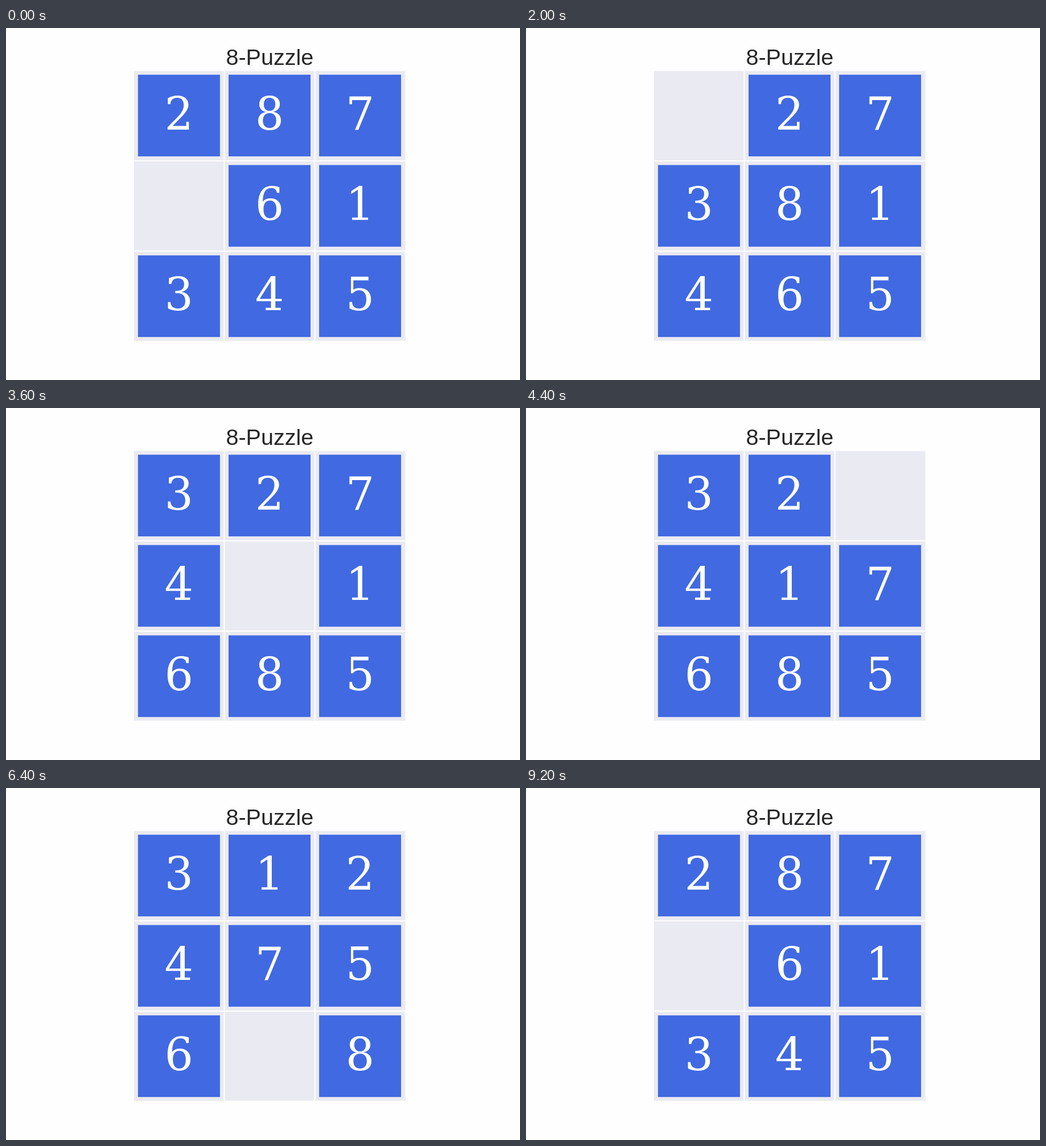
These frames come from a looping animation (903x620 px, 9600 ms). An HTML page:

```html
<!DOCTYPE html>
<html lang="en">
<head>
<meta charset="utf-8">
<title>8-Puzzle</title>
<style>
  html, body { margin: 0; width: 100%; height: 100%; overflow: hidden; background: #fefefe; }
  svg { display: block; }
  text { text-anchor: middle; }
  .title { font: 39.5px "Liberation Sans", Arial, sans-serif; fill: #262626; }
  #tiles { font: 79.5px "DejaVu Serif", serif; fill: #fff; }
  #tiles.solved { fill: #ffd700; }
  #tiles rect { fill: #4169e1; }
</style>
</head>
<body>
<svg width="903" height="620" viewBox="0 0 903 620">
  <text class="title" x="463.3" y="65">8-Puzzle</text>
  <rect x="225" y="75.7" width="476.5" height="475" fill="#eaeaf2"/>
  <path d="M383.5 75.7V550.7M542.7 75.7V550.7M225 233.9H701.5M225 393H701.5" stroke="#fff" stroke-width="2"/>
  <g id="tiles"></g>
</svg>
<script>
const STEP = 400, LOOP = 9600, RESTART = 9200, PITCH = 159.1;
const START = [2, 8, 7, 0, 6, 1, 3, 4, 5];
// Cells visited by the gap, numbered row by row
const GAP_PATH = [3, 6, 7, 4, 1, 0, 3, 6, 7, 4, 5, 2, 1, 4, 5, 8, 7, 4, 3, 0];
const LAST = GAP_PATH.length - 1;

const boards = [START];
for (let i = 1; i <= LAST; i++) {
  const board = [...boards[i - 1]], from = GAP_PATH[i - 1], to = GAP_PATH[i];
  [board[from], board[to]] = [board[to], board[from]];
  boards.push(board);
}

const group = document.getElementById("tiles");
for (let n = 1; n <= 8; n++) {
  group.innerHTML += `<g><rect width="144" height="143.8"/><text x="72" y="96.7">${n}</text></g>`;
}

let shown = -1;
function draw(now) {
  const time = now % LOOP;
  const move = time < RESTART ? Math.min(Math.floor(time / STEP), LAST) : 0;
  if (move !== shown) {
    shown = move;
    boards[move].forEach((n, cell) => {
      if (!n) return;
      const x = 231.9 + PITCH * (cell % 3), y = 82.3 + PITCH * Math.floor(cell / 3);
      group.children[n - 1].setAttribute("transform", `translate(${x} ${y})`);
    });
    group.classList.toggle("solved", move === LAST);
  }
}

const start = performance.now();
function tick() {
  draw(performance.now() - start);
  requestAnimationFrame(tick);
}
tick();
</script>
</body>
</html>
```
